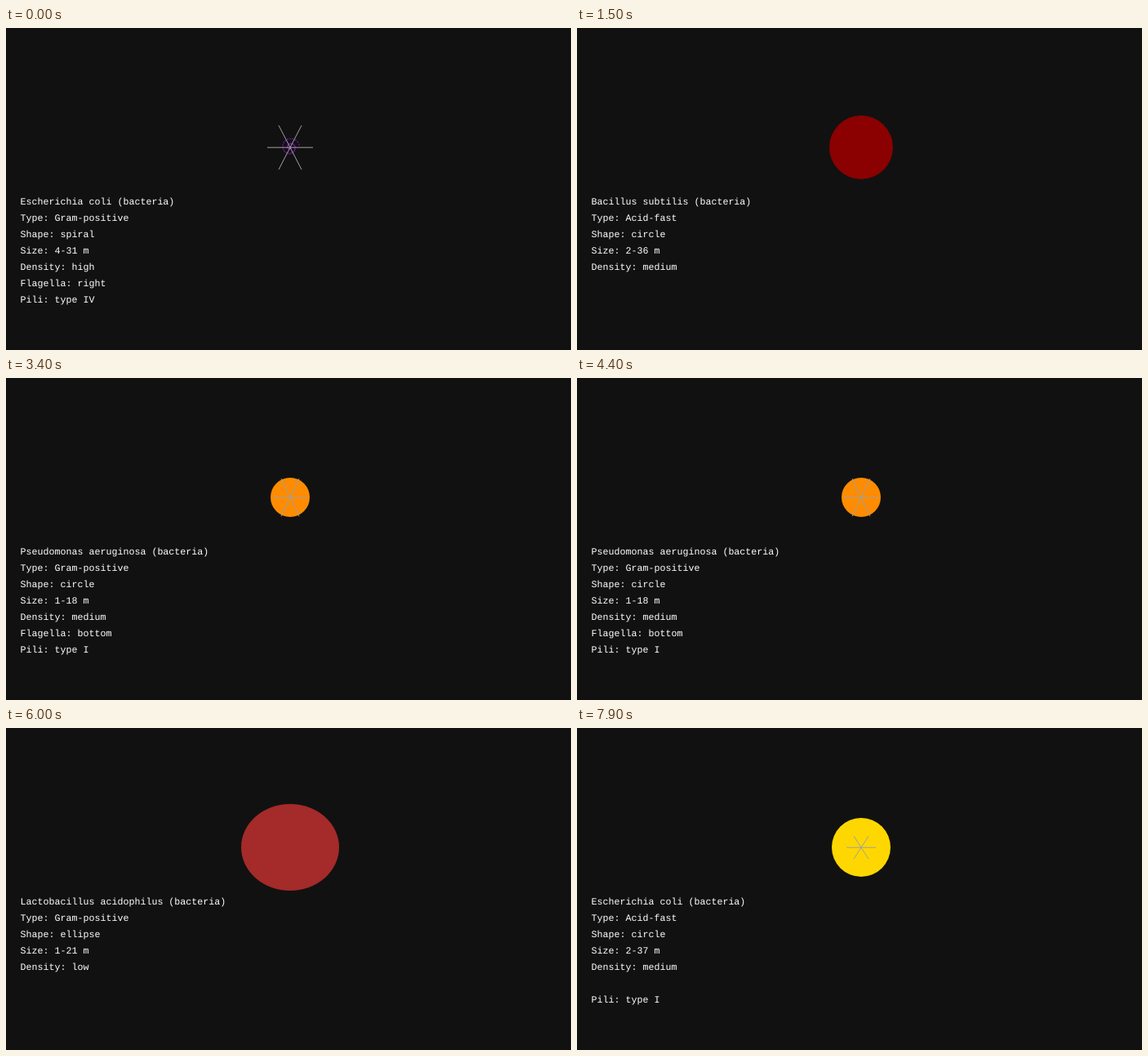
Recreate the animation shown at these times as an HTML page. Size 692 by 394 pixels, loop 8 s.

```html
<!DOCTYPE html>
<html lang="en">
<head>
<meta charset="utf-8">
<title>Bacteria generator</title>
<style>
  html, body { margin: 0; width: 100%; height: 100%; overflow: hidden; background: #111; }
  svg { display: block; width: 692px; height: 394px; }
  text {
    font: 11.667px "Liberation Mono", monospace;
    fill: #fff;
    white-space: pre;
    text-rendering: geometricPrecision;
  }
  .pili { stroke: #a0a0a0; stroke-width: 1; fill: none; }
</style>
</head>
<body>
<svg viewBox="0 0 692 394">
  <rect width="692" height="394" fill="#111"/>
  <g id="cell"></g>
  <g id="info"></g>
</svg>
<script>
const LOOP = 8000, CX = 348, CY = 146;
const LEFT = 17.5, BASE = 216, LEADING = 20;

// pili: [half length of the level line, x and y reach of the slanted lines]
const organisms = [
  { at: 0, name: "Escherichia coli", type: "Gram-positive", shape: "spiral", size: "4-31",
    density: "high", flagella: "right", piliType: "type IV", color: "#6a1296", pili: [28, 14, 27] },
  { at: 500, name: "Staphylococcus aureus", type: "Gram-negative", shape: "circle", size: "3-38",
    density: "low", flagella: "left", piliType: "type IV", color: "#4682b4", r: [40, 40], pili: [24, 12, 20] },
  { at: 1500, name: "Bacillus subtilis", type: "Acid-fast", shape: "circle", size: "2-36",
    density: "medium", color: "#8b0000", r: [39, 39] },
  { at: 2000, name: "Salmonella enterica", type: "Gram-negative", shape: "circle", size: "4-16",
    density: "high", flagella: "bottom", piliType: "sex pili", color: "#66cdaa", r: [30, 30], pili: [28, 13, 15] },
  { at: 2900, name: "Pseudomonas aeruginosa", type: "Gram-positive", shape: "circle", size: "1-18",
    density: "medium", flagella: "bottom", piliType: "type I", color: "#ff8c00", r: [24, 24], pili: [21, 11, 23] },
  { at: 4800, name: "Bacillus subtilis", type: "Gram-negative", shape: "circle", size: "2-24",
    density: "low", flagella: "left", piliType: "sex pili", color: "#4682b4", r: [26, 26], pili: [20, 10, 18] },
  { at: 5400, name: "Salmonella enterica", type: "Acid-fast", shape: "circle", size: "3-28",
    density: "medium", flagella: "right", color: "#66cdaa", r: [30, 30] },
  { at: 6000, name: "Lactobacillus acidophilus", type: "Gram-positive", shape: "ellipse", size: "1-21",
    density: "low", color: "#a52a2a", r: [60, 53] },
  { at: 6600, name: "Helicobacter pylori", type: "Gram-negative", shape: "spiral", size: "1-33",
    density: "high", flagella: "right", color: "#46e01c" },
  { at: 7600, name: "Escherichia coli", type: "Acid-fast", shape: "circle", size: "2-37",
    density: "medium", piliType: "type I", color: "#ffd700", r: [36, 36], pili: [18, 9, 14] }
];

const cell = document.getElementById("cell");
const info = document.getElementById("info");

function spiral(color) {
  let dots = "";
  for (let i = 0; i < 40; i++) {
    const a = i * Math.PI / 10, r = i * 0.3;
    const x = CX + r * Math.cos(a), y = CY + r * Math.sin(a);
    dots += `<circle cx="${x.toFixed(2)}" cy="${y.toFixed(2)}" r="1"/>`;
  }
  return `<g fill="${color}">${dots}</g>`;
}

function body(o) {
  if (o.shape === "spiral") return spiral(o.color);
  return `<ellipse cx="${CX}" cy="${CY}" rx="${o.r[0]}" ry="${o.r[1]}" fill="${o.color}"/>`;
}

function pili(o) {
  if (!o.pili) return "";
  const [w, dx, dy] = o.pili;
  const ray = (x, y) => `M${CX - x} ${CY + 0.2 - y}L${CX + x} ${CY + 0.2 + y}`;
  return `<path class="pili" d="${ray(w, 0)}${ray(dx, dy)}${ray(dx, -dy)}"/>`;
}

function lines(o) {
  return [
    `${o.name} (bacteria)`,
    `Type: ${o.type}`,
    `Shape: ${o.shape}`,
    `Size: ${o.size} m`,
    `Density: ${o.density}`,
    o.flagella ? `Flagella: ${o.flagella}` : "",
    o.piliType ? `Pili: ${o.piliType}` : ""
  ];
}

let shown = null;

function draw(t) {
  const o = organisms.findLast(item => item.at <= t);
  if (o === shown) return;
  shown = o;
  cell.innerHTML = body(o) + pili(o);
  info.innerHTML = lines(o)
    .map((s, i) => `<text x="${LEFT}" y="${BASE + i * LEADING}">${s}</text>`)
    .join("");
}

const start = performance.now();

function tick() {
  draw((performance.now() - start) % LOOP);
  requestAnimationFrame(tick);
}

tick();
</script>
</body>
</html>
```
